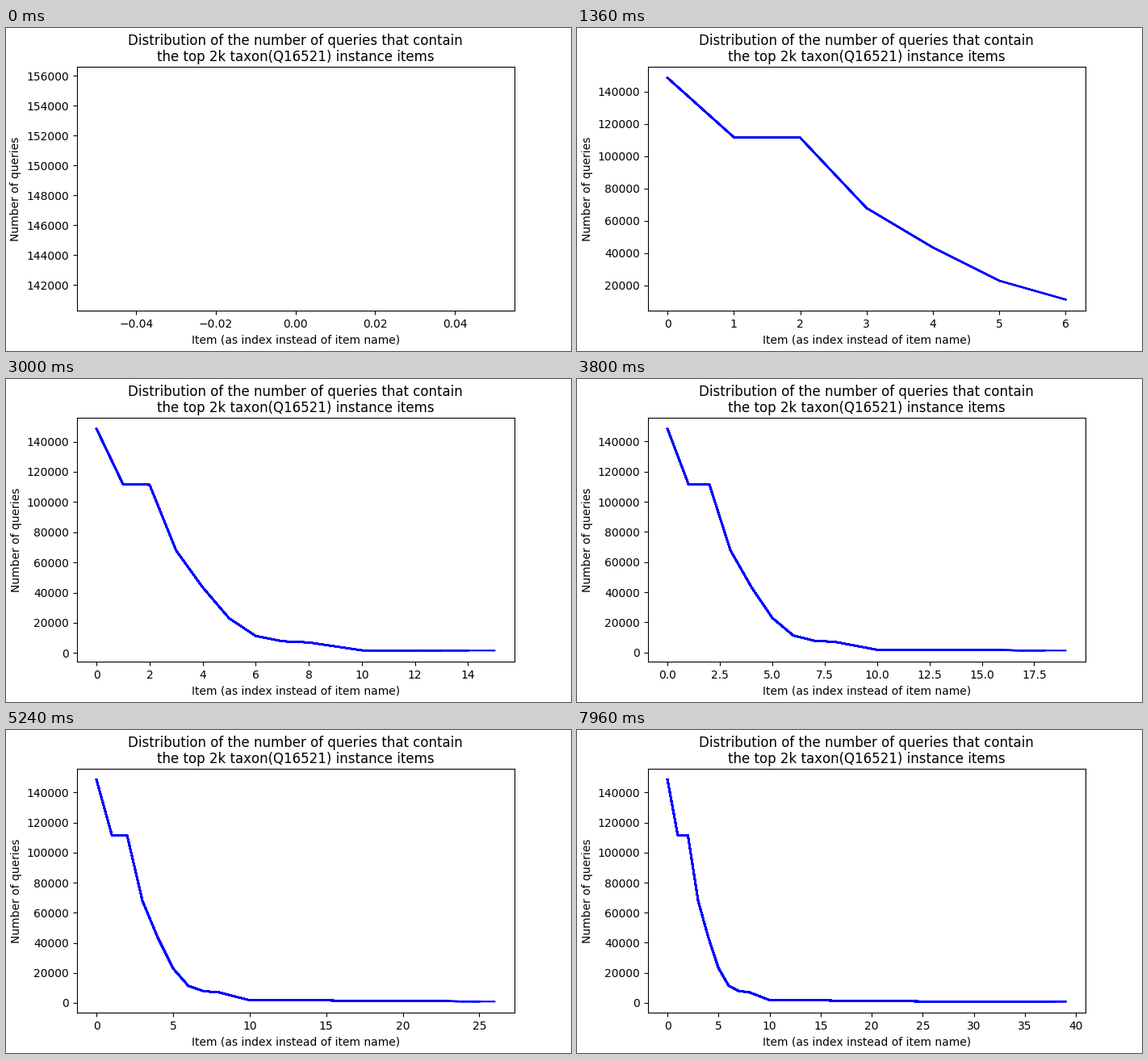
Write a matplotlib script that moves like this. It is 700 px wide and 400 px high and loops after 8000 ms.

```python
import matplotlib.pyplot as plt
from matplotlib.animation import FuncAnimation
from matplotlib.collections import LineCollection
import numpy as np

FRAMES = 200
INTERVAL = 40
FRAMES_PER_ITEM = 5.0426
MARGIN = 0.05

# Bends of the falling curve as (item, queries); straight in between
KNOTS = [(0, 148445), (1, 111700), (2, 111400), (3, 67900), (4, 43500),
         (5, 22950), (6, 11300), (7, 7800), (8, 7000), (10, 1780),
         (15, 1650), (17, 1340), (22, 1180), (25, 910), (39, 820)]
ITEMS = np.arange(KNOTS[-1][0] + 1)
COUNTS = np.interp(ITEMS, *zip(*KNOTS))
POINTS = np.column_stack([ITEMS, COUNTS])

plt.rcParams["font.family"] = "DejaVu Sans"
plt.rcParams["text.kerning_factor"] = 6  # whole-pixel kerning
fig, ax = plt.subplots(figsize=(7, 4), dpi=100)
fig.subplots_adjust(left=0.125, right=0.9, bottom=0.125, top=0.88)
ax.set_title("Distribution of the number of queries that contain\n"
             "the top 2k taxon(Q16521) instance items",
             pad=5, linespacing=1.12)
ax.set_xlabel("Item (as index instead of item name)")
ax.set_ylabel("Number of queries")

curves = LineCollection([], colors="blue", linewidths=1.5,
                        capstyle="projecting", joinstyle="round")
ax.add_collection(curves, autolim=False)


def last_item(frame):
    return int((frame + 1) / FRAMES_PER_ITEM)


def padded(low, high):
    pad = MARGIN * (high - low)
    return low - pad, high + pad


def update(frame):
    # Every step plots the curve again on top, so older parts look heavier
    ends = [last_item(i) for i in range(frame + 1)]
    curves.set_segments([POINTS[:end + 1] for end in ends if end > 0])

    last = ends[-1]
    top = COUNTS[0]
    if last == 0:
        ax.set_xlim(padded(-0.05, 0.05))
        ax.set_ylim(padded(0.95 * top, 1.05 * top))
    else:
        ax.set_xlim(padded(0, last))
        ax.set_ylim(padded(COUNTS[last], top))
    return (curves,)


anim = FuncAnimation(fig, update, frames=FRAMES, interval=INTERVAL,
                     repeat=True, repeat_delay=0, blit=False)
plt.show()
```
